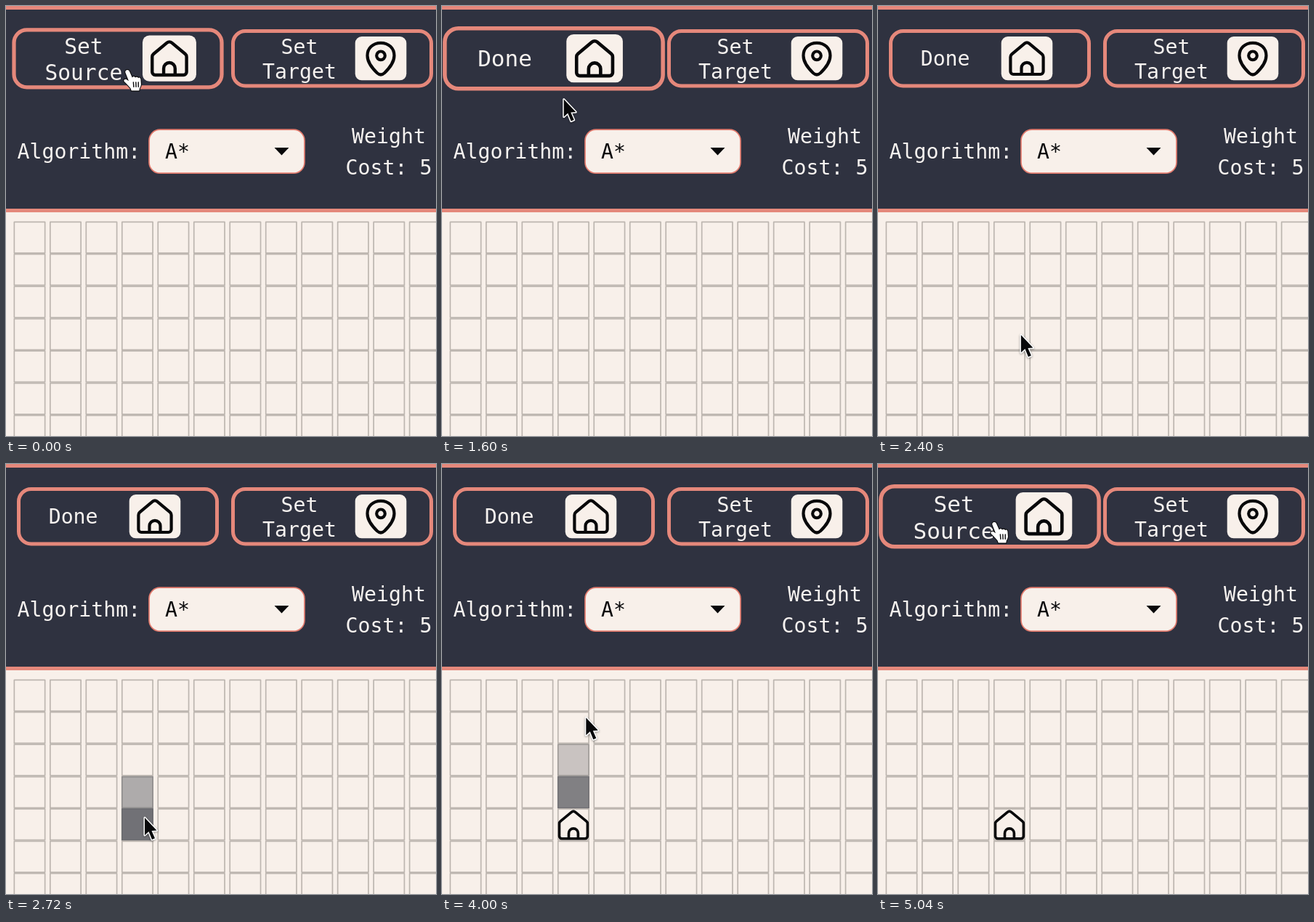
Animation of 592 by 592 pixels, one loop 5.12 s. Source, as an HTML page with a canvas:

```html
<!DOCTYPE html>
<html lang="en">
<head>
<meta charset="utf-8">
<title>Path finder</title>
<style>
html, body { margin: 0; width: 100%; height: 100%; overflow: hidden; background: #f8f0ea; }
canvas { display: block; width: 592px; height: 592px; }
</style>
</head>
<body>
<canvas id="stage" width="592" height="592"></canvas>
<script>
const ctx = document.getElementById('stage').getContext('2d');
const LOOP = 5120, STEP = 80;
const DARK = '#2f3240', CORAL = '#e5887b', CREAM = '#f8f0ea', INK = '#08080a';
const DONE_AT = 640, PLACED_AT = 3360, RESET_AT = 4960;
const GRID = { x: 10.5, y: 296.5, dx: 49.48, dy: 44.4, w: 44, rows: 7, cols: 12 };
const HOME = { row: 4, col: 3 };

// Each move eases from the previous stop; bend bows the path sideways
const moves = [
  { from: -320, to: 320, x: 160, y: 80 },
  { from: 1520, to: 1800, x: 199, y: 325 },
  { from: 1880, to: 2120, x: 207, y: 395 },
  { from: 2200, to: 2540, x: 191, y: 487 },
  { from: 3590, to: 4640, x: 161, y: 80, bend: 20 }
];

function ease(t, from, to) {
  const u = Math.min(1, Math.max(0, (t - from) / (to - from)));
  return u * u * (3 - 2 * u);
}

function pointer(t) {
  let x = 176, y = 96;
  for (const m of moves) {
    const e = ease(t, m.from, m.to);
    x += (m.x - x) * e + (m.bend || 0) * Math.sin(Math.PI * e);
    y += (m.y - y) * e;
  }
  return { x, y };
}

function zoom(t) {
  const ramp = from => ease(t, from, from + 330);
  return 1 + 0.1 * (ramp(-160) - ramp(1600) + ramp(4404));
}

// Cells darken with the time the pointer recently spent on them
function hoverLevels(t) {
  const LAG = 110, SPAN = 237, FULL = 173, TICK = 3, levels = {};
  for (let s = 0; s < SPAN; s += TICK) {
    const p = pointer(t - LAG - s);
    const row = Math.floor((p.y - GRID.y) / GRID.dy), col = Math.floor((p.x - GRID.x) / GRID.dx);
    const key = row + ',' + col;
    if (p.x - GRID.x - col * GRID.dx < GRID.w) levels[key] = Math.min(1, (levels[key] || 0) + TICK / FULL);
  }
  if (t >= PLACED_AT) levels[HOME.row + ',' + HOME.col] = 0;
  return levels;
}

function rect(x, y, w, h, color) {
  ctx.fillStyle = color;
  ctx.fillRect(x, y, w, h);
}

function box(x, y, w, h, r, fill, stroke, width) {
  ctx.beginPath();
  ctx.roundRect(x, y, w, h, r);
  if (fill) { ctx.fillStyle = fill; ctx.fill(); }
  if (stroke) { ctx.strokeStyle = stroke; ctx.lineWidth = width; ctx.stroke(); }
}

function text(str, x, y, align = 'center', color = '#f7f3f0') {
  ctx.font = '28.2px "DejaVu Sans Mono", monospace';
  ctx.textAlign = align;
  ctx.fillStyle = color;
  ctx.fillText(str, x, y);
}

function at(x, y, scale, draw) {
  ctx.save();
  ctx.translate(x, y);
  ctx.scale(scale, scale);
  draw();
  ctx.restore();
}

function pen(color, width) {
  ctx.strokeStyle = color;
  ctx.lineWidth = width;
  ctx.lineCap = ctx.lineJoin = 'round';
}

function house() {
  pen(INK, 4.2);
  ctx.beginPath();
  ctx.moveTo(0, 21.7);
  ctx.arcTo(-22.6, 21.7, -22.6, 0, 4);
  ctx.arcTo(-22.6, -4.5, 0, -23.4, 5);
  ctx.arcTo(0, -23.4, 22.6, -4.5, 5);
  ctx.arcTo(22.6, -4.5, 22.6, 21.7, 5);
  ctx.arcTo(22.6, 21.7, 0, 21.7, 4);
  ctx.closePath();
  ctx.moveTo(-7.5, 21.7);
  ctx.lineTo(-7.5, 13);
  ctx.arc(0, 13, 7.5, Math.PI, 0);
  ctx.lineTo(7.5, 21.7);
  ctx.stroke();
}

const pinShape = new Path2D('M0-21.5C11-21.5 18.5-14 18.5-4C18.5 6 11 14 5 20Q0 24.5-5 20C-11 14-18.5 6-18.5-4C-18.5-14-11-21.5 0-21.5Z');

function pin() {
  pen(INK, 4.2);
  ctx.stroke(pinShape);
  ctx.beginPath();
  ctx.arc(0, -4, 5.8, 0, 7);
  ctx.stroke();
}

function button(x, scale, lines, textX, iconX, icon) {
  at(x, 72.3, scale, () => {
    box(-136.5, -37.7, 273, 75.4, 17, null, CORAL, 5);
    const top = lines.length > 1 ? -6 : 10;
    lines.forEach((line, i) => text(line, textX, top + 34 * i));
    box(iconX - 35.3, -30.3, 70.6, 60.3, 9, CREAM);
    at(iconX, 0, 1, icon);
  });
}

function header(t) {
  rect(0, 0, 592, 284, DARK);
  rect(0, 0, 592, 5, CORAL);
  rect(0, 279, 592, 5, CORAL);
  const done = t >= DONE_AT && t < RESET_AT;
  button(449, 1, ['Set', 'Target'], -45, 67, pin);
  if (done) button(154, zoom(t), ['Done'], -61.4, 51, house);
  else button(154, zoom(t), ['Set', 'Source'], -45, 67.7, house);
  text('Algorithm:', 15.5, 209.6, 'left');
  box(197, 170.2, 214, 60, 15, CREAM, '#e27b6e', 1.7);
  text('A*', 219, 210, 'left', INK);
  at(379.5, 195, 1, () => {
    ctx.fillStyle = INK;
    ctx.fill(new Path2D('M-10 0H10L0 10.500Z'));
  });
  text('Weight', 527, 188.6);
  text('Cost: 5', 527, 231.6);
}

function grid(t) {
  const levels = hoverLevels(t);
  rect(0, 284, 592, 308, CREAM);
  pen('#bdb6b0', 1.7);
  for (let row = 0; row < GRID.rows; row++) {
    for (let col = 0; col < GRID.cols; col++) {
      const x = GRID.x + col * GRID.dx, y = GRID.y + row * GRID.dy;
      ctx.strokeRect(x + 0.85, y + 0.85, GRID.w - 1.7, GRID.dy - 1.7);
      ctx.globalAlpha = levels[row + ',' + col] || 0;
      rect(x, y, GRID.w, GRID.dy, '#606167');
      ctx.globalAlpha = 1;
    }
  }
  if (t >= PLACED_AT) {
    at(GRID.x + HOME.col * GRID.dx + GRID.w / 2, GRID.y + (HOME.row + 0.5) * GRID.dy + 0.8, 0.86, house);
  }
}

const handShape = new Path2D('M-3 3Q-3 0 0 0Q2 0 3 3L6 10Q8 7 10 10Q12 8 14 10.5Q16 9 17 12L17.5 19Q17 22 15.5 24L15 27H5L4 24Q-1 18-4.5 15Q-5.5 12-2 12L1.5 14.5Z');
const handLines = new Path2D('M7.5 16L8 22M10.8 16L11 22M14 16V22');
const arrowShape = new Path2D('M0 0V24L5.5 19L10 30L14 28.3L9.5 18L16.5 17.5Z');

function hand() {
  pen(INK, 2);
  ctx.stroke(handShape);
  ctx.fillStyle = '#fff';
  ctx.fill(handShape);
  ctx.lineWidth = 1.3;
  ctx.stroke(handLines);
}

function arrow() {
  pen('#fff', 3);
  ctx.shadowColor = 'rgba(0,0,0,.4)';
  ctx.shadowBlur = 3;
  ctx.shadowOffsetY = 1;
  ctx.stroke(arrowShape);
  ctx.shadowColor = 'transparent';
  ctx.fillStyle = INK;
  ctx.fill(arrowShape);
}

function cursor(t) {
  const { x, y } = pointer(t);
  if (y < 117) at(x - 0.6, y, 1.06, hand);
  else at(x, y, 1, arrow);
}

const start = performance.now();
function frame() {
  const t = Math.floor((performance.now() - start) % LOOP / STEP) * STEP;
  grid(t);
  header(t);
  cursor(t);
  requestAnimationFrame(frame);
}
frame();
</script>
</body>
</html>
```
